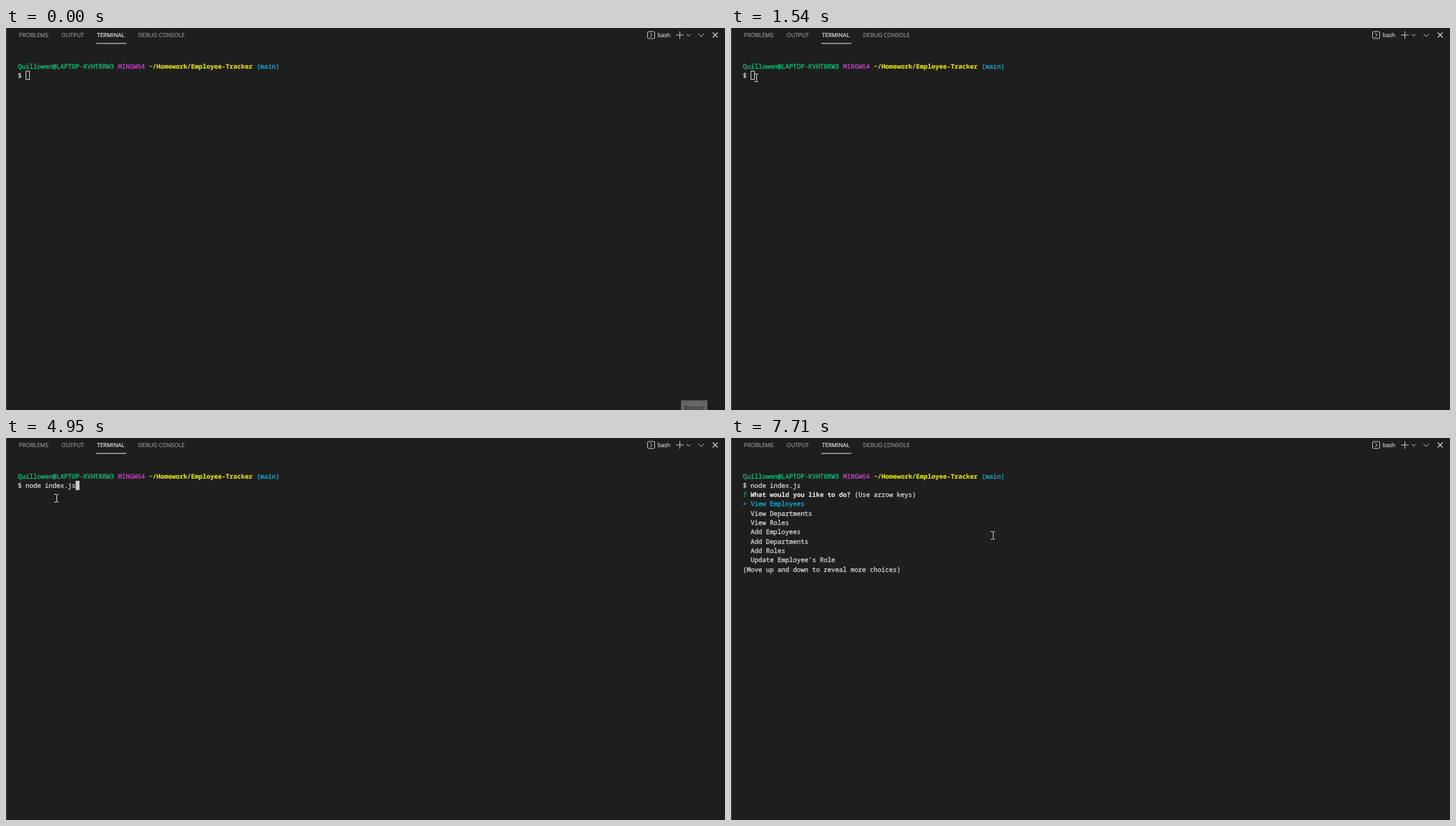
An HTML page with a canvas for the animation above (8 s loop, 1027 by 545 pixels).

```html
<!DOCTYPE html>
<html lang="en">
<head>
<meta charset="utf-8">
<title>Terminal session</title>
<style>
  html, body { margin: 0; width: 100%; height: 100%; overflow: hidden; background: #1e1e1e; }
  canvas { display: block; }
</style>
</head>
<body>
<canvas id="stage"></canvas>
<script>
const WIDTH = 1027, HEIGHT = 545, LOOP = 8000;
const CELL = 5.498, ROW = 13.3, LEFT = 17, TOP = 47.7;
const MONO = '9.163px "Noto Sans Mono", monospace';
const SANS = '8.13px "Open Sans", "Noto Sans", sans-serif';
const COLOR = {
  back: '#1e1e1e', text: '#cccccc', bright: '#e7e7e7', dim: '#969696',
  green: '#0dbc79', magenta: '#bc3fbc', yellow: '#e5e510', cyan: '#11a8cd'
};

const canvas = document.getElementById('stage');
const ctx = canvas.getContext('2d');
const scale = window.devicePixelRatio || 1;
canvas.width = WIDTH * scale;
canvas.height = HEIGHT * scale;
canvas.style.width = WIDTH + 'px';
canvas.style.height = HEIGHT + 'px';
ctx.scale(scale, scale);
ctx.textRendering = 'geometricPrecision';
ctx.lineJoin = 'round';

// [time, typed command, cursor column]
const typing = [
  [0, '', 2], [2350, 'n', 3], [2480, 'no', 4], [2740, 'nod', 5],
  [3140, 'no', 5], [3210, 'no', 4], [3690, 'n', 3], [3890, '', 2],
  [4550, 'exit', 6], [4950, 'node index.js', 15]
];
const FOCUS = 2350, ENTER = 6420, MENU = 7030;
const choices = ['View Departments', 'View Roles', 'Add Employees',
  'Add Departments', 'Add Roles', "Update Employee's Role"];

// [time, x, y, eased arrival]
const mousePath = [
  [0, 978, 560], [840, 58, 99, true], [980, 47.5, 90], [1190, 24, 80],
  [1400, 30, 68], [1680, 42, 74], [1820, 72, 86], [7350, 72, 86],
  [7700, 374, 139, true]
];

function label(text, x, y, color, font = SANS, weight = 0.2) {
  ctx.font = font;
  ctx.fillStyle = ctx.strokeStyle = color;
  ctx.lineWidth = weight;
  ctx.fillText(text, x, y);
  ctx.strokeText(text, x, y); // thickens the thin strokes of small text
}

function print(text, col, row, color = COLOR.text, bold = false) {
  const font = (bold ? 'bold ' : '') + MONO;
  label(text, LEFT + col * CELL, TOP + 9.8 + row * ROW, color, font, bold ? 0.1 : 0.35);
}

function stroke(path, color = '#c5c5c5', width = 1) {
  ctx.strokeStyle = color;
  ctx.lineWidth = width;
  ctx.stroke(new Path2D(path));
}

function drawPanel() {
  ctx.fillStyle = COLOR.back;
  ctx.fillRect(0, 0, WIDTH, HEIGHT);
  ctx.fillStyle = '#3c3c3c';
  ctx.fillRect(0, 0, 1.4, HEIGHT);

  label('PROBLEMS', 18.6, 13, COLOR.dim);
  label('OUTPUT', 79.3, 13, COLOR.dim);
  label('TERMINAL', 130, 13, COLOR.bright);
  label('DEBUG CONSOLE', 188.7, 13, COLOR.dim);
  stroke('M129 22H172', COLOR.bright);

  label('bash', 930.7, 13, COLOR.text);
  stroke('M917.5 5H925.5L926.5 6V14L925.5 15H917.5L916.5 14V6Z');
  stroke('M920 7L923 10L920 13');
  stroke('M957 10H968M962.5 4.5V15.5');
  stroke('M972 8.7L975 11.7L978 8.7');
  stroke('M989 8.2L993 12.2L997 8.2');
  stroke('M1009.5 6.5L1016.5 13.5M1016.5 6.5L1009.5 13.5', '#d0d0d0', 1.2);
}

function drawButton() {
  ctx.fillStyle = '#666666';
  ctx.fillRect(964, 531, 38, 14);
  stroke('M964.5 545V531.5H1001.5V545', '#555555');
  label('Record', 968.7, 545.3, '#333333', SANS.replace('8.13', '8.9'));
}

function drawCursor(col, row, solid) {
  const x = LEFT + col * CELL, y = TOP + row * ROW;
  if (solid) {
    ctx.fillStyle = COLOR.text;
    ctx.fillRect(x, y, CELL, ROW);
  } else {
    ctx.strokeStyle = COLOR.text;
    ctx.lineWidth = 1;
    ctx.strokeRect(Math.round(x) + 0.5, Math.round(y) + 0.5, 5, 12);
  }
}

function drawTerminal(t) {
  print('Quillowen@LAPTOP-KVHT8RW3', 0, 0, COLOR.green);
  print('MINGW64', 26, 0, COLOR.magenta);
  print('~/Homework/Employee-Tracker', 34, 0, COLOR.yellow, true);
  print('(main)', 62, 0, COLOR.cyan);

  const [, command, column] = typing.findLast(([start]) => start <= t);
  print('$', 0, 1);
  print(command, 2, 1);
  if (t < ENTER) drawCursor(column, 1, t >= FOCUS);
  else if (t < MENU) drawCursor(0, 2, true);
  else drawMenu();
}

function drawMenu() {
  print('?', 0, 2, COLOR.green);
  print('What would you like to do?', 2, 2, COLOR.bright, true);
  print('(Use arrow keys)', 29, 2);
  print('> View Employees', 0, 3, COLOR.cyan);
  choices.forEach((choice, i) => print(choice, 2, 4 + i));
  print('(Move up and down to reveal more choices)', 0, 10);
}

function mouseAt(t) {
  const next = mousePath.findIndex(([time]) => time > t);
  if (next < 0) return mousePath.at(-1).slice(1, 3);
  const [t0, x0, y0] = mousePath[next - 1];
  const [t1, x1, y1, eased] = mousePath[next];
  let k = (t - t0) / (t1 - t0);
  if (eased) k = k * k * (3 - 2 * k);
  return [x0 + (x1 - x0) * k, y0 + (y1 - y0) * k];
}

function drawMouse(t) {
  // The pointer is sampled about every 70 ms.
  const [px, py] = mouseAt(Math.floor((t + 10) / 70) * 70);
  const x = Math.floor(px), y = Math.round(py);
  ctx.fillStyle = '#d8d8d8';
  ctx.fillRect(x, y - 5, 1, 10);
  for (const edge of [y - 6, y + 5]) {
    ctx.fillRect(x - 3, edge, 3, 1);
    ctx.fillRect(x + 1, edge, 2, 1);
  }
}

function frame() {
  const t = performance.now() % LOOP;
  drawPanel();
  drawTerminal(t);
  if (t < 70) drawButton();
  else drawMouse(t);
  requestAnimationFrame(frame);
}
frame();
</script>
</body>
</html>
```
